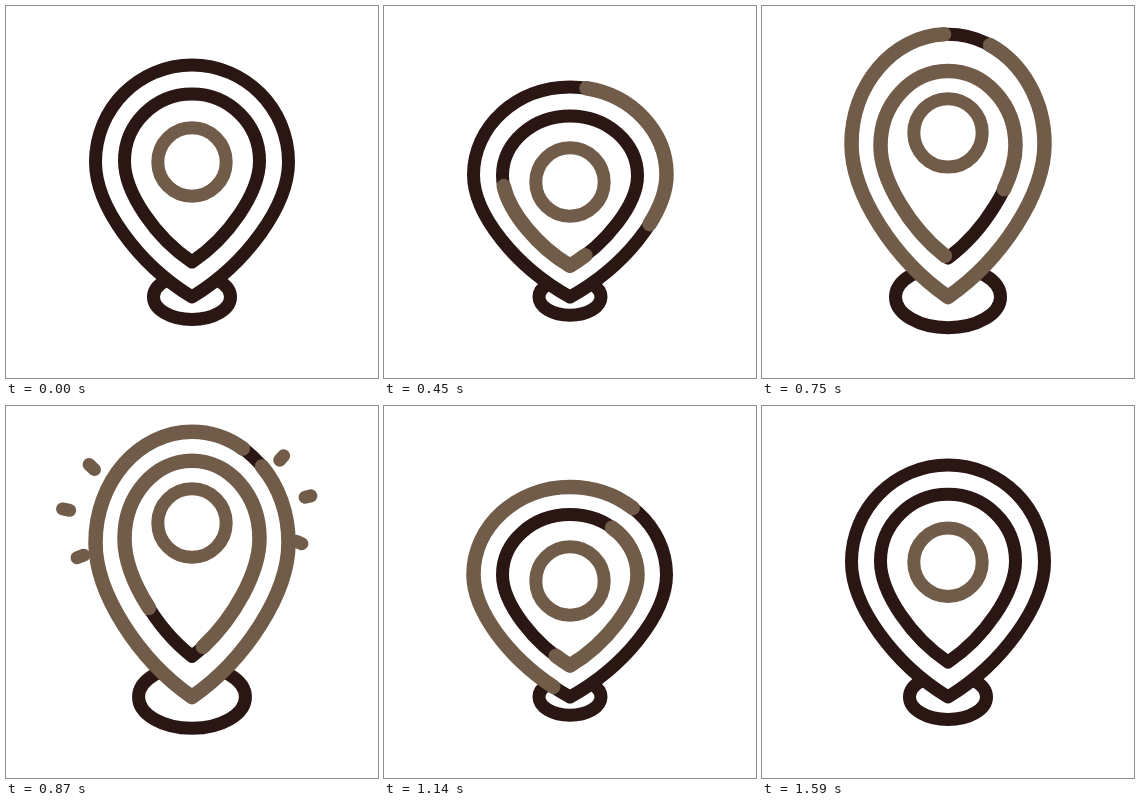
Animation of 372 by 372 pixels, one loop 1.98 s. Source, as an HTML page:

```html
<!DOCTYPE html>
<html lang="en">
<head>
<meta charset="utf-8">
<title>Map pin</title>
<style>
  html, body { margin: 0; width: 100%; height: 100%; overflow: hidden; background: #fff; }
  svg { display: block; width: 100vw; height: 100vh; }
  svg * { fill: none; stroke: #2a1613; stroke-width: 13; stroke-linecap: round; stroke-linejoin: round; }
  svg .glow { stroke: #715c4a; stroke-width: 14.5; }
  svg .thin { stroke-width: 13; }
  svg .solid { fill: #fff; }
</style>
</head>
<body>
<svg viewBox="0 0 372 372">
  <ellipse id="base" cx="186" cy="291"/>
  <g id="sparks"></g>
  <path id="outer" class="solid"/>
  <path id="outerGlow" class="glow" pathLength="1"/>
  <path id="inner"/>
  <path id="innerGlow" class="glow" pathLength="1"/>
  <circle id="hole" class="glow thin" cx="186" r="34.2"/>
</svg>
<script>
const LOOP = 1980, STEP = 30, CX = 186, GROUND = 291;
const $ = id => document.getElementById(id);

// Eased progress of t from a to b, 0..1
function ease(t, a, b) {
  const u = Math.min(1, Math.max(0, (t - a) / (b - a)));
  return u * u * (3 - 2 * u);
}

// Squash down, spring up, squash again, settle
function bounce(t, down, up) {
  return down * ease(t, 180, 390) + (up - down) * ease(t, 470, 820)
    + (down - up) * ease(t, 820, 1140) - down * ease(t, 1200, 1590);
}

// Clockwise teardrop from its top, scaled vertically from the ground
function drop(p, shift) {
  const k = (GROUND - p.top - shift) / (GROUND - p.top);
  const at = (x, y) => (CX + x).toFixed(2) + ' ' + (GROUND - (GROUND - y) * k).toFixed(2);
  const { w, top, mid, tip, c1, cx, c2 } = p;
  const kx = w * 0.552, ky = mid - (mid - top) * 0.552;
  return `M${at(0, top)}C${at(kx, top)} ${at(w, ky)} ${at(w, mid)}` +
    `C${at(w, c1)} ${at(cx, c2)} ${at(0, tip)}` +
    `C${at(-cx, c2)} ${at(-w, c1)} ${at(-w, mid)}` +
    `C${at(-w, ky)} ${at(-kx, top)} ${at(0, top)}Z`;
}

const OUTER = { w: 96.5, top: 59, mid: 156, tip: 291, c1: 200, cx: 54, c2: 258 };
const INNER = { w: 67.5, top: 88, mid: 155, tip: 256, c1: 187, cx: 36, c2: 232 };

function trim(el, start, end, turn) {
  const len = end - start;
  const shown = len > 0.0005;
  el.style.display = shown ? '' : 'none';
  if (!shown) return;
  el.style.strokeDasharray = `${len} ${1 - len}`;
  el.style.strokeDashoffset = 1 - (start + turn) % 1;
}

function drawPin(name, shape, shift, start, end, turn) {
  const d = drop(shape, shift), glow = $(name + 'Glow');
  $(name).setAttribute('d', d);
  glow.setAttribute('d', d);
  trim(glow, start, end, turn);
}

// End point, travel vector and delay of each spark
const SPARKS = [
  [72, 48, -19, -18, 0], [42, 100, -25, -5, 0], [57, 157, -24, 9, 0],
  [290, 36, 17, -19, 18], [323, 85.5, 25, -6, 18], [311.5, 144.5, 23, 10, 12]
].map(([x, y, dx, dy, delay]) => {
  const el = document.createElementNS('http://www.w3.org/2000/svg', 'line');
  el.setAttribute('class', 'glow thin');
  $('sparks').append(el);
  return { el, x, y, dx, dy, delay };
});

function drawSpark(s, t) {
  const head = 1 - ease(t - s.delay, 790, 970);
  const tail = 1 - ease(t - s.delay, 830, 1005);
  const set = (k, v) => s.el.setAttribute(k, v);
  s.el.style.display = head < 1 && tail > 0 ? '' : 'none';
  set('x1', s.x - s.dx * tail);
  set('y1', s.y - s.dy * tail);
  set('x2', s.x - s.dx * head);
  set('y2', s.y - s.dy * head);
}

function draw(t) {
  const rx = 38.5 + bounce(t, -7.5, 16.5);
  $('base').setAttribute('rx', rx);
  $('base').setAttribute('ry', rx * 0.585);

  const turn = Math.max(0, t - 225) * 0.00012;
  drawPin('outer', OUTER, bounce(t, 22, -37),
    ease(t, 775, 1590), ease(t, 225, 850), turn);
  drawPin('inner', INNER, bounce(t - 30, 22, -34),
    ease(t, 690, 1520), ease(t, 170, 960), turn + 0.43);

  $('hole').setAttribute('cy', 156 + bounce(t - 25, 20, -40));
  SPARKS.forEach(s => drawSpark(s, t));
}

const begin = performance.now();
function tick() {
  const t = (performance.now() - begin) % LOOP;
  draw(Math.floor(t / STEP) * STEP);
  requestAnimationFrame(tick);
}
tick();
</script>
</body>
</html>
```
